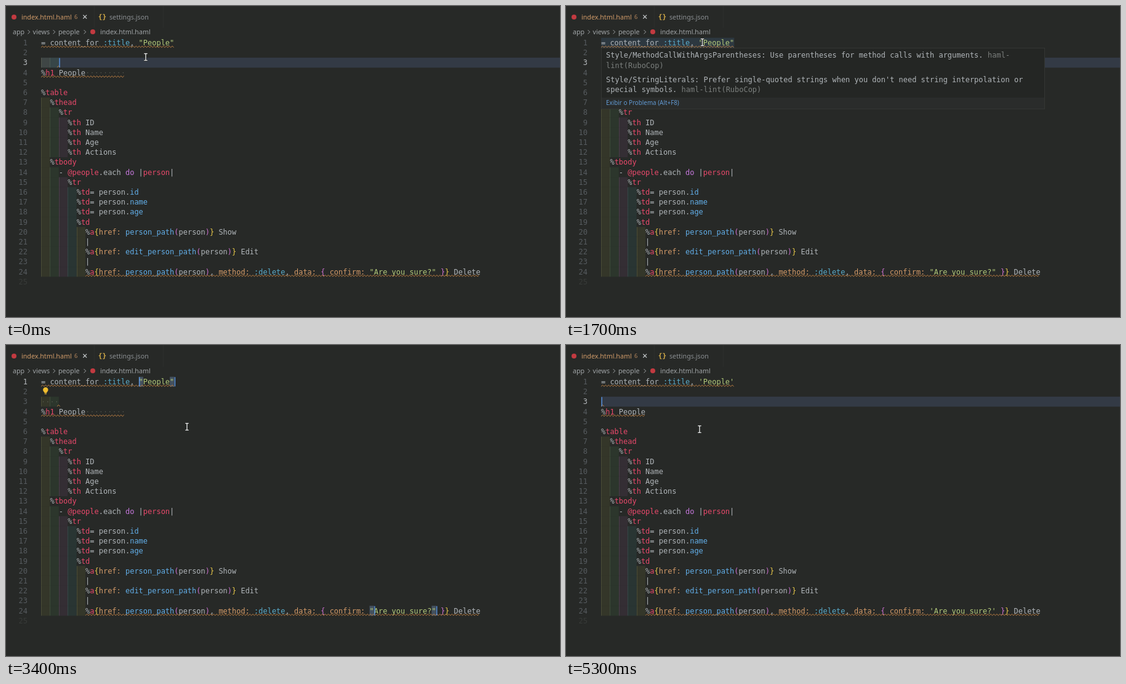
Animation of 900 by 506 pixels, one loop 5.4 s. Source, as an HTML page with a canvas:

```html
<!DOCTYPE html>
<html lang="en">
<head>
<meta charset="utf-8">
<title>Editor quick fixes</title>
<style>
  html, body { margin: 0; width: 100%; height: 100%; overflow: hidden; background: #272927; }
  canvas { display: block; }
</style>
</head>
<body>
<canvas id="stage" width="900" height="506"></canvas>
<script>
const ctx = document.getElementById('stage').getContext('2d');
const LOOP = 5400, STEP = 100;
const LEFT = 57, TOP = 51.7, CHAR = 7.21, ROW = 16.2;
const MONO = '11.98px "DejaVu Sans Mono", monospace';
const ui = size => `${size}px "Noto Sans", sans-serif`;
const BG = '#272927', BAND = '#333a45', CARET = '#5a9cf0', SELECT = '#44515f';

const INK = { w: '#b0b5b9', r: '#e8496b', b: '#62aee8', c: '#5aaccb', s: '#b2c97a',
              o: '#d39a68', p: '#c678dd', y: '#e8c84a', m: '#cc70d0' };
const INDENT = ['rgba(255,255,64,.06)', 'rgba(127,255,127,.06)',
                'rgba(255,127,255,.06)', 'rgba(79,236,236,.06)'];

// "^x" switches the ink; "`" stands for the current quote character.
const link = path => `%^ra^y{^ohref: ^b${path}^m(^wperson^m)`;
const CODE = [
  '= content_for ^c:title^w, ^s`People`', '', '', '%^rh1^w People', '',
  '%^rtable', '  %^rthead', '    %^rtr',
  ...['ID', 'Name', 'Age', 'Actions'].map(s => `      %^rth^w ${s}`),
  '  %^rtbody', '    - ^r@people^w.each ^pdo^w |^rperson^w|', '      %^rtr',
  ...['id', 'name', 'age'].map(s => `        %^rtd^w= person.^b${s}`),
  '        %^rtd',
  `          ${link('person_path')}^y}^w Show`, '          |',
  `          ${link('edit_person_path')}^y}^w Edit`, '          |',
  `          ${link('person_path')}^w, ^omethod: ^c:delete^w, ^odata: ^m{ ^oconfirm: ^s\`Are you sure?\`^m }^y}^w Delete`,
  ''
];
const QUOTES = [[1, 22], [1, 29], [24, 74], [24, 88]];   // [line, column]

// Moments of each action, in ms
const HOVER = 400, FIX_GONE = 1300, CLICK = 1800, BULB = 2100,
      TYPE = 3500, MOVE = 4000, SAVE = 4500;
const ADD = [CLICK, 2700, 2900, 3100];
const ACTIONS = [0, ...ADD, TYPE, MOVE, SAVE];

const POINTER = [[0, 227, 83], [100, 227, 83], [400, 221, 65], [1200, 221, 65], [1500, 223, 59],
  [1800, 221, 59], [2200, 294, 130], [2800, 294, 131], [3400, 294, 133],
  [3800, 239, 87], [4000, 239, 87], [4500, 217, 137], [5400, 217, 137]];

const colX = col => LEFT + col * CHAR;
const rowY = line => TOP + (line - 1) * ROW;

function box(x, y, w, h, color) {
  ctx.fillStyle = color;
  ctx.fillRect(x, y, w, h);
}
function dot(x, y, r, color) {
  ctx.fillStyle = color;
  ctx.beginPath();
  ctx.arc(x, y, r, 0, 7);
  ctx.fill();
}
function text(s, x, y, color, font = MONO) {
  ctx.font = font;
  ctx.fillStyle = color;
  ctx.fillText(s, x, y);
}
function stroke(points, color, width = 1) {
  ctx.strokeStyle = color;
  ctx.lineWidth = width;
  ctx.beginPath();
  points.forEach(([x, y]) => ctx.lineTo(x, y));
  ctx.stroke();
}
function squiggle(line, from, to) {
  const y = rowY(line) + 14.6, points = [];
  for (let x = colX(from), i = 0; x <= colX(to); x += 2.45, i++) points.push([x, y + (i % 2 ? -1.2 : 1.2)]);
  stroke(points, '#c08043');
}
function cell(line, col, color) {
  box(colX(col), rowY(line), CHAR, ROW, color);
}
function caret(line, col) {
  box(colX(col) + .5, rowY(line) + .5, 1.3, ROW - 1, CARET);
}
function indent(line, depth) {
  for (let i = 0; i < depth; i++) {
    const x = colX(i * 2), color = INDENT[i % 4];
    box(x, rowY(line), CHAR * 2, ROW, color);
    box(Math.round(x), rowY(line), 1, ROW, color);
    box(Math.round(x), rowY(line), 1, ROW, 'rgba(255,255,255,.06)');
  }
}
function spaces(line, col, count) {
  for (let i = 0; i < count; i++) dot(colX(col + i + .5), rowY(line) + 8.3, .8, '#55584f');
}

function drawHeader(dirty) {
  box(143, 0, 1, 35, '#2c2e2c');
  box(255, 0, 1, 35, '#2c2e2c');
  dot(13, 18, 4, '#c23a40');
  text('index.html.haml', 25, 21.5, '#cf9a68', ui(10.7));
  text('6', 111, 21, '#b98a5e', ui(9.3));
  if (dirty) dot(128.3, 17.7, 3.3, '#c6cacc');
  else {
    stroke([[125.3, 14.7], [131.1, 20.5]], '#c6cacc', 1.2);
    stroke([[131.1, 14.7], [125.3, 20.5]], '#c6cacc', 1.2);
  }
  text('{}', 149.8, 21.2, '#d3ab48', 'bold 11px "DejaVu Sans Mono", monospace');
  text('settings.json', 168, 21.5, '#8b8f92', ui(10.7));

  for (const [s, x] of [['app', 11], ['views', 43.5], ['people', 85], ['index.html.haml', 153]])
    text(s, x, 45.8, '#a0a4a7', ui(10.7));
  for (const x of [35.5, 76.5, 126.5])
    stroke([[x, 39], [x + 3.2, 42.2], [x, 45.4]], '#a0a4a7');
  dot(141, 42, 4, '#c23a40');
}

function drawLine(line, quote, active) {
  const y = rowY(line) + 12.3;
  ctx.textAlign = 'right';
  text(line, 35, y, active ? '#b4b8bb' : line === 25 ? '#383b39' : '#565b5f');
  ctx.textAlign = 'left';
  let col = 0;
  CODE[line - 1].split('^').forEach((part, i) => {
    const s = (i ? part.slice(1) : part).replaceAll('`', quote);
    text(s, colX(col), y, INK[i ? part[0] : 'w']);
    col += s.length;
  });
}

function drawQuoteMarks(t) {
  QUOTES.forEach(([line, col], i) => {
    if (t >= ADD[i]) cell(line, col, SELECT);
    else {
      ctx.strokeStyle = '#b9bcb8';
      ctx.lineWidth = 1;
      ctx.strokeRect(Math.round(colX(col)) + .5, Math.round(rowY(line)) + .5, 6, 15);
    }
  });
}

function drawCarets(t, selecting, typed) {
  if (selecting) QUOTES.forEach(([line, col], i) => {
    if (t >= ADD[i]) caret(line, i ? col + 1 : col);
  });
  else if (typed) QUOTES.forEach(([line, col]) => caret(line, col + 1));
  else caret(3, t >= SAVE ? 0 : 4);
}

function drawBulb() {
  dot(64.3, 73, 4.2, '#f0bd2e');
  box(62.3, 75, 4, 3, '#f0bd2e');
  box(62.6, 78.7, 3.4, 1.4, '#d8ac38');
}

function drawHover(withFix) {
  box(LEFT, 68, 721, 100, '#242624');
  box(LEFT, 149, 721, 19, '#2a2c2b');
  ctx.strokeStyle = '#343634';
  ctx.lineWidth = 1;
  ctx.strokeRect(LEFT + .5, 68.5, 720, 99);
  const x = LEFT + 8, dim = '#7b7f7d';
  text('Style/MethodCallWithArgsParentheses: Use parentheses for method calls with arguments.', x, 84.2, INK.w);
  text('haml-', x + 86 * CHAR, 84.2, dim);
  text('lint(RuboCop)', x, 100.6, dim);
  text("Style/StringLiterals: Prefer single-quoted strings when you don't need string interpolation or", x, 124, INK.w);
  text('special symbols.', x, 140.2, INK.w);
  text('haml-lint(RuboCop)', x + 17 * CHAR, 140.2, dim);
  text('Exibir o Problema (Alt+F8)', x, 161, '#6199d2', ui(9.85));
  if (withFix) text('Correção Rápida... (Ctrl+.)', 198, 161, '#6199d2', ui(9.85));
}

function drawPointer(t) {
  const i = POINTER.findIndex(p => p[0] > t);
  const [t0, x0, y0] = POINTER[i - 1], [t1, x1, y1] = POINTER[i];
  const k = (t - t0) / (t1 - t0), e = k * k * (3 - 2 * k);
  const x = x0 + (x1 - x0) * e, y = y0 + (y1 - y0) * e;
  for (const [color, width] of [['#161816', 3], ['#e8eaea', 1.4]]) {
    stroke([[x, y - 5.5], [x, y + 5.5]], color, width);
    for (const end of [-5.5, 5.5]) stroke([[x - 2.7, y + end], [x + 2.7, y + end]], color, width);
  }
}

function draw(t) {
  const selecting = t >= CLICK && t < TYPE;
  const typed = t >= TYPE && t < MOVE;
  const saved = t >= SAVE;
  const hovering = t >= HOVER && t < CLICK;
  const activeLine = selecting || typed ? 1 : 3;
  const caretOn = (t - ACTIONS.findLast(a => a <= t)) % 800 < 400;

  box(0, 0, 900, 506, BG);
  drawHeader(t >= TYPE && !saved);

  const bands = typed ? [1, 24] : selecting ? [] : [3];
  for (const line of bands) box(LEFT, rowY(line), 900 - LEFT, ROW, BAND);
  if (hovering) box(LEFT, rowY(1), 30 * CHAR, ROW, '#2d3840');
  CODE.forEach((s, i) => indent(i + 1, s.search(/\S|$/) / 2));
  if (!saved) {
    indent(3, 2);
    if (activeLine === 1) spaces(3, 0, 4);
    spaces(4, 10, 9);
  }
  if (selecting) drawQuoteMarks(t);
  if (typed) for (const col of [63, 90]) cell(24, col, '#6b5580');

  const quote = t >= TYPE ? "'" : '"';
  CODE.forEach((s, i) => drawLine(i + 1, quote, i + 1 === activeLine));

  squiggle(1, 0, 30);
  squiggle(3, saved ? 0 : 3.6, saved ? 1 : 4.6);
  squiggle(4, 0, saved ? 10 : 19);
  squiggle(24, 10, 99);

  if (caretOn) drawCarets(t, selecting, typed);
  if (t >= BULB && t < MOVE) drawBulb();
  if (hovering) drawHover(t < FIX_GONE);
  drawPointer(t);
}

const start = performance.now();
function tick() {
  const t = (performance.now() - start) % LOOP;
  draw(Math.floor(t / STEP) * STEP);
  requestAnimationFrame(tick);
}
tick();
</script>
</body>
</html>
```
